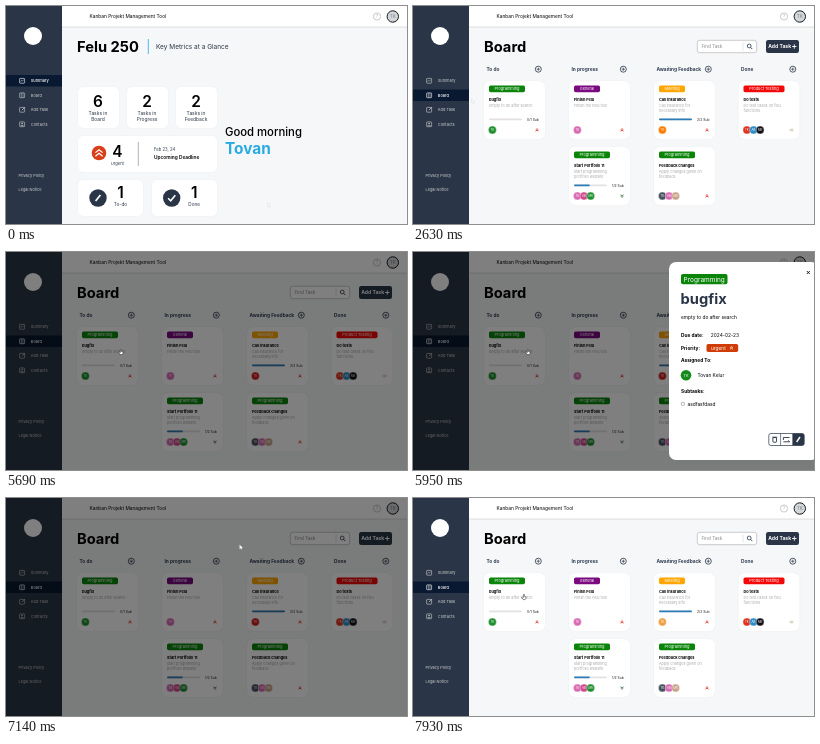
These frames come from a looping animation (401x218 px, 8000 ms). An HTML page with a canvas:

```html
<!DOCTYPE html>
<html lang="en">
<head>
<meta charset="utf-8">
<title>Kanban board</title>
<style>
html, body { margin: 0; width: 100%; height: 100%; overflow: hidden; background: #f6f7f8; }
canvas { display: block; width: 401px; height: 218px; }
</style>
</head>
<body>
<canvas id="stage"></canvas>
<script>
const W = 401, H = 218, LOOP = 8000;
const NAVY = '#2a3647', CYAN = '#29abe2', GREEN = '#0a850a', RED = '#d8401a', GREY = '#a8a8a8';
const canvas = document.getElementById('stage');
const c = canvas.getContext('2d');
const ratio = window.devicePixelRatio || 1;
canvas.width = Math.round(W * ratio);
canvas.height = Math.round(H * ratio);

// Pointer stops: time, x, y, and 1 where it is a hand
const POINTER = [
  [0, 263, 199], [500, 200, 160], [640, 120, 120], [770, 57, 94], [910, 46, 94], [1030, 36, 94],
  [1170, 28, 90, 1], [2630, 60, 95], [2760, 100, 98], [2890, 137, 99], [3040, 170, 101],
  [4230, 148, 102], [4360, 125, 101], [4500, 115, 100, 1], [6340, 247, 47], [6480, 256, 38],
  [6610, 262, 28], [6740, 265, 22, 1], [7010, 255, 34], [7140, 235, 49], [7270, 212, 65],
  [7400, 190, 78], [7540, 173, 89], [7670, 150, 93], [7800, 128, 97], [7930, 111, 99, 1]
];
const SHADE = [[0, 0], [5690, .5], [7670, 0]];
const DIALOG = [[0, null], [5950, 130], [6080, 0], [6880, 36], [7010, null]];
const CALL_COLOUR = [[0, '#ff7a00'], [5690, '#d01c1c'], [7540, '#f0a040']];

const COLUMNS = [['To do', 71], ['In progress', 156], ['Awaiting Feedback', 241], ['Done', 325.5]];
const CARDS = [
  { col: 0, row: 0, tag: 'Programming', colour: GREEN, wide: 36, title: 'bugfix',
    lines: ['empty to do after search'], done: 0, sub: '0/1 Sub', people: ['#1c8f2c'], mark: 'up' },
  { col: 1, row: 0, tag: 'General', colour: '#7b0a80', wide: 26, title: 'Finish Felu',
    lines: ['Finish the Felu tool'], people: ['#d86ab4'], mark: 'up' },
  { col: 2, row: 0, tag: 'Meeting', colour: '#ffa500', wide: 26, title: 'Call insurance',
    lines: ['Call insurance for', 'necessary info'], done: 1, sub: '2/2 Sub', people: ['call'], mark: 'up' },
  { col: 3, row: 0, tag: 'Product Testing', colour: '#f20808', wide: 41, title: 'Do tests',
    lines: ['Do test cases on felu', 'functions'], people: ['#e03018', '#2a8cc8', '#101018'], mark: 'equal' },
  { col: 1, row: 1, tag: 'Programming', colour: GREEN, wide: 36, title: 'Start Portfolio 11',
    lines: ['start programming', 'portfolio website'], done: .48, sub: '1/2 Sub',
    people: ['#d86ab4', '#d0488c', '#1c8f2c'], mark: 'down' },
  { col: 2, row: 1, tag: 'Programming', colour: GREEN, wide: 36, title: 'Feedback changes',
    lines: ['Apply changes given on', 'feedback'], people: ['#46525e', '#d86ab4', '#c8a088'], mark: 'up' }
];

const at = (track, t) => track.filter(k => k[0] <= t).pop();

function text(s, x, y, size, colour = '#000', weight = 400, align = 'left') {
  c.font = `${weight} ${size}px Inter, sans-serif`;
  c.fillStyle = colour;
  c.textAlign = align;
  c.fillText(s, x, y);
}

function box(x, y, w, h, r, fill, stroke, width = .5) {
  c.beginPath();
  c.roundRect(x, y, w, h, r);
  paint(fill, stroke, width);
}

function disc(x, y, r, fill, stroke, width = .5) {
  c.beginPath();
  c.arc(x, y, r, 0, Math.PI * 2);
  paint(fill, stroke, width);
}

function paint(fill, stroke, width) {
  if (fill) { c.fillStyle = fill; c.fill(); }
  if (stroke) { c.strokeStyle = stroke; c.lineWidth = width; c.stroke(); }
}

function line(colour, width, ...p) {
  c.beginPath();
  for (let i = 0; i < p.length; i += 2) c.lineTo(p[i], p[i + 1]);
  paint(null, colour, width);
}

function plus(x, y, r, colour, width) {
  line(colour, width, x - r, y, x + r, y);
  line(colour, width, x, y - r, x, y + r);
}

function panel(x, y, w, h, r) {
  c.save();
  c.shadowColor = 'rgba(0,0,0,.06)';
  c.shadowBlur = 2 * ratio;
  box(x, y, w, h, r, '#fff');
  c.restore();
}

function chevrons(x, y, w, colour, width, dir = 1) {
  for (const d of [-.5, .5]) {
    const m = y + d * w;
    line(colour, width, x - w, m + dir * w * .4, x, m - dir * w * .4, x + w, m + dir * w * .4);
  }
}

function sidebar(active) {
  c.fillStyle = NAVY;
  c.fillRect(0, 0, 56, H);
  disc(27, 30, 9, '#fff');
  c.fillStyle = '#091931';
  c.fillRect(0, active ? 83.5 : 69, 56, 11.5);
  ['Summary', 'Board', 'Add Task', 'Contacts'].forEach((name, i) => {
    const y = 74.8 + i * 14.5, colour = i === active ? '#fff' : '#cdcdcd';
    box(13.6, y - 2.4, 5, 4.8, .6, null, colour, .6);
    if (i === 0) line(colour, .5, 14.6, y + .8, 15.6, y - .5, 16.5, y + .3, 17.7, y - 1.2);
    if (i === 1) { line(colour, .5, 15.3, y - 2.2, 15.3, y + 2.2); line(colour, .5, 17, y - 2.2, 17, y + 2.2); }
    if (i === 2) line(colour, .8, 16, y + .3, 19, y - 2.7);
    if (i === 3) { disc(16.1, y - .7, .8, colour); line(colour, .7, 14.7, y + 1.3, 17.5, y + 1.3); }
    text(name, 24.8, y + 1.4, 3.95, colour, i === active ? 500 : 400);
  });
  text('Privacy Policy', 12.5, 170.5, 3.9, '#cdcdcd');
  text('Legal Notice', 12.5, 185, 3.9, '#cdcdcd');
}

function header() {
  c.fillStyle = '#fff';
  c.fillRect(56, 0, W - 56, 21);
  c.fillStyle = '#d9d9d9';
  c.fillRect(56, 20.6, W - 56, .9);
  text('Kanban Projekt Management Tool', 83.5, 12.3, 4.82);
  disc(371, 10.5, 3.6, null, '#b4b4b4', .7);
  text('?', 371, 12.4, 5, '#b4b4b4', 400, 'center');
  disc(386.8, 10.5, 5.7, '#d4d7d9', '#15191f', 1);
  text('TK', 386.8, 12.2, 4.6, '#8a9299', 500, 'center');
}

function stat(n, x, y, size, ...labels) {
  text(n, x, y, 15.4, '#000', 600, 'center');
  labels.forEach((s, i) => text(s, x, y + 8 + i * 6, size, NAVY, 400, 'center'));
}

function summary() {
  text('Felu 250', 71, 45.7, 14.7, '#000', 700);
  line(CYAN, .8, 142.3, 33, 142.3, 48);
  text('Key Metrics at a Glance', 150, 42.8, 6.5, NAVY);

  [['6', 'Board', 72], ['2', 'Progress', 121], ['2', 'Feedback', 170]].forEach(([n, label, x]) => {
    panel(x, 81, 41, 41, 5);
    stat(n, x + 20, 101, 4.9, 'Tasks in', label);
  });

  panel(72, 130, 139, 36, 5);
  disc(93, 147, 7.3, RED);
  chevrons(93, 147, 3.6, '#fff', 1.2);
  stat('4', 111.3, 150.6, 4.1, 'Urgent');
  line('#8c949c', .7, 132.3, 136, 132.3, 160);
  text('Feb 23, 24', 148, 145.2, 4.2, NAVY);
  text('Upcoming Deadline', 148, 152.6, 4.8, '#000', 600);

  [['To-do', 72, 92], ['Done', 146, 165.7]].forEach(([label, x, cx], i) => {
    panel(x, 174, 65, 36, 5);
    disc(cx, 192, 8.7, NAVY);
    if (i) line('#fff', 1.6, cx - 3.6, 192.2, cx - 1, 194.8, cx + 3.6, 189.2);
    else line('#fff', 1.7, cx - 2.4, 195, cx + 2.4, 189);
    stat('1', cx + 22.5, 192.2, 4.7, label);
  });

  text('Good morning', 219, 129.8, 11.3, '#000', 500);
  text('Tovan', 219, 148, 15.4, CYAN, 700);
}

function card(k, t) {
  const x = COLUMNS[k.col][1], y = k.row ? 141 : 75, left = x + 5;
  panel(x, y, 61, 58, 6);
  box(left, y + 4.4, k.wide, 6.8, 1.7, k.colour);
  text(k.tag, left + k.wide / 2, y + 9.2, 3.95, '#fff', 400, 'center');
  text(k.title, left, y + 19.6, 3.86, '#000', 700);
  k.lines.forEach((s, i) => text(s, left, y + 26.2 + i * 4.7, 3.75, GREY));
  if (k.sub) {
    box(left, y + 37.4, 33, 1.8, .9, '#e4e0e0');
    if (k.done) box(left, y + 37.4, 33 * k.done, 1.8, .9, '#2c7db8');
    text(k.sub, x + 43, y + 39.7, 3.4, '#222');
  }
  k.people.forEach((colour, i) => {
    const px = x + 8.4 + i * 6.6;
    disc(px, y + 49, 4, colour === 'call' ? at(CALL_COLOUR, t)[1] : colour, '#fff', .4);
    text(['TK', 'AB', 'MR'][i], px, y + 50.1, 2.8, '#fff', 400, 'center');
  });
  const mx = x + 53, my = y + 49;
  if (k.mark === 'equal') for (const d of [-.7, .7]) line('#b9a58c', .6, mx - 1.8, my + d, mx + 1.8, my + d);
  else if (k.mark === 'up') chevrons(mx, my, 1.4, '#e02a18', .8);
  else chevrons(mx, my, 1.4, '#3c6a3c', .8, -1);
}

function board(t) {
  text('Board', 71, 45.7, 14.7, '#000', 700);
  box(284.3, 34.3, 59.4, 12.4, 2.4, '#fff', GREY, .6);
  text('Find Task', 288.5, 42.1, 4.6, '#8c8c8c');
  line('#c8c8c8', .5, 330, 36.5, 330, 44.5);
  disc(336.2, 40, 1.9, null, NAVY, .8);
  line(NAVY, .9, 337.6, 41.4, 339.3, 43.1);
  box(353, 34, 33, 13, 2.2, NAVY);
  text('Add Task', 355.2, 42.3, 5.05, '#fff', 700);
  plus(381.3, 40.5, 2.2, '#fff', .9);
  COLUMNS.forEach(([name, x]) => {
    text(name, x + 2.5, 65.1, 4.82, '#2f3d52', 700);
    disc(x + 54.3, 63.2, 3, null, NAVY, .8);
    plus(x + 54.3, 63.2, 1.6, NAVY, .7);
  });
  CARDS.forEach(k => card(k, t));
}

function dialog(shift) {
  c.save();
  c.translate(shift, 0);
  box(126, 10, 149.5, 198, 7, '#fff');
  box(138, 22, 46.5, 10.3, 2, GREEN);
  text('Programming', 161.2, 29.5, 6.5, '#fff', 400, 'center');
  line('#111', .9, 263.8, 19, 266.8, 22);
  line('#111', .9, 266.8, 19, 263.8, 22);
  text('bugfix', 137.6, 52, 14.7, NAVY, 700);
  text('empty to do after search', 138, 66.6, 4.82);
  [['Due date:', 84.6], ['Priority:', 97.6], ['Assigned To:', 110.2], ['Subtasks:', 140.6]]
    .forEach(([s, y]) => text(s, 138, y, 4.82, '#000', 700));
  text('2024-02-23', 167.8, 84.6, 4.82);
  box(163.5, 92, 31.7, 8, 1.7, '#d03c08');
  text('urgent', 168, 97.7, 4.82, '#fff');
  chevrons(188.5, 96, 1.5, '#fff', .7);
  disc(143, 123.2, 5.3, '#148a1c');
  text('TK', 143, 124.6, 3.8, '#fff', 400, 'center');
  text('Tovan Kelur', 154.5, 125, 4.82);
  box(138.4, 150.3, 3, 3, .5, null, '#777', .5);
  text('asdfasfdasd', 144.5, 153.9, 4.82);

  box(225.8, 181.5, 35.4, 12, 2, '#fff', NAVY, .7);
  box(249.4, 181.5, 11.8, 12, [0, 2, 2, 0], NAVY);
  line(NAVY, .6, 237.6, 181.5, 237.6, 193.5);
  line(NAVY, .9, 229.2, 185.2, 234.2, 185.2);
  box(229.9, 185.6, 3.6, 4.6, .5, null, NAVY, .9);
  line(NAVY, .9, 246.6, 185.5, 240.4, 185.5, 240.4, 188);
  line(NAVY, .9, 240.4, 189.8, 246.6, 189.8, 245.2, 188.3);
  line('#fff', 1.4, 253.6, 190, 257, 185);
  c.restore();
}

function pointer([, x, y, hand]) {
  c.beginPath();
  const shape = hand
    ? [-.6, -2.5, .4, -2.5, .4, -.6, 2, -.2, 2, 1.2, 1.2, 2.6, -.9, 2.6, -2.1, .6, -1.6, 0, -.6, .6]
    : [-1.4, -2.2, -1.4, 2, -.4, 1.2, .3, 2.5, 1, 2.1, .4, .9, 1.7, .8];
  for (let i = 0; i < shape.length; i += 2) c.lineTo(x + shape[i], y + shape[i + 1]);
  c.closePath();
  paint('#fff', hand ? '#222' : '#bbb', hand ? .5 : .25);
}

function draw(now) {
  const t = now % LOOP, onBoard = t >= 1710;
  c.setTransform(ratio, 0, 0, ratio, 0, 0);
  c.fillStyle = '#f6f7f8';
  c.fillRect(0, 0, W, H);
  header();
  sidebar(onBoard ? 1 : 0);
  if (onBoard) board(t); else summary();
  c.fillStyle = `rgba(0,0,0,${at(SHADE, t)[1]})`;
  c.fillRect(0, 0, W, H);
  const shift = at(DIALOG, t)[1];
  if (shift !== null) dialog(shift);
  pointer(at(POINTER, t));
}

const start = performance.now();
function tick() {
  draw(performance.now() - start);
  requestAnimationFrame(tick);
}
tick();
</script>
</body>
</html>
```
